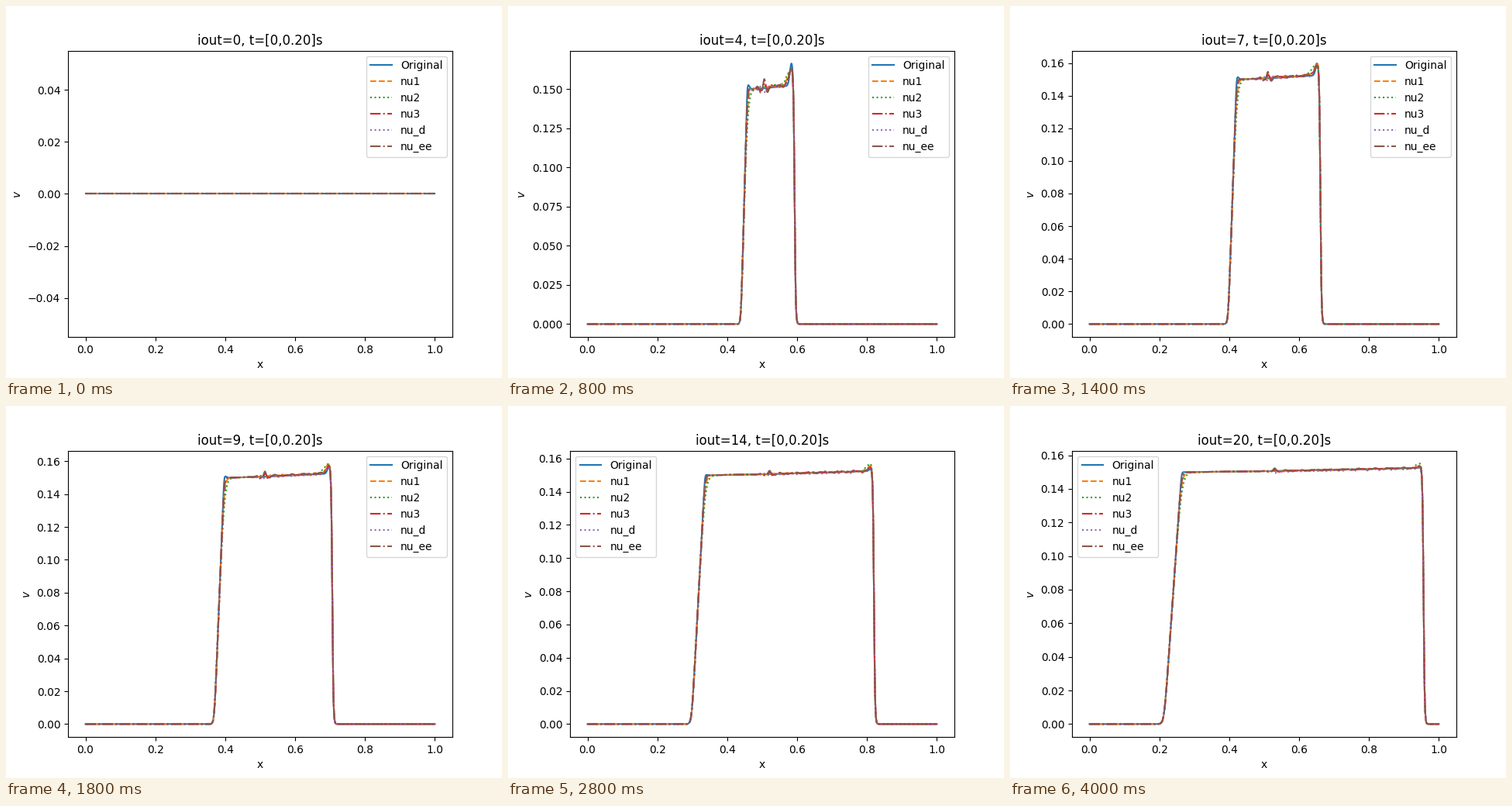
A matplotlib script for the animation above (4.2 s loop, 640 by 480 pixels).

```python
import numpy as np
import matplotlib.pyplot as plt
from matplotlib.animation import FuncAnimation

FRAMES, INTERVAL = 21, 200
x = np.linspace(0, 1, 1000)

# label: line style, smoothing strength, kink at the contact
SERIES = {
    "Original": ("-", 0.0, 0.0),
    "nu1": ("--", 0.6, 0.3),
    "nu2": (":", 1.0, 0.3),
    "nu3": ("-.", 0.3, 0.5),
    "nu_d": (":", 0.3, -0.5),
    "nu_ee": ("-.", 0.3, 1.0),
}


def bump(center, width):
    return np.exp(-((x - center) / width) ** 2)


def step(z):
    return 0.5 * (1 + np.tanh(z / 2))


def soft_ramp(start, rounding):
    return rounding * np.logaddexp(0, (x - start) / rounding)


def ripples(u, seed):
    """A few seeded waves carried along with the contact."""
    rng = np.random.default_rng(seed)
    waves = zip(rng.uniform(0.016, 0.045, 3), rng.uniform(0, 2 * np.pi, 3))
    return sum(np.sin(2 * np.pi * u / length + phase) for length, phase in waves) / 2


def velocity(n, blur, kink):
    """Plateau between a widening rarefaction fan and a moving shock."""
    if n == 0:
        return np.zeros_like(x)
    fade = np.exp(-(n - 4) / 5)
    middle, fan_width = 0.5005 - 0.0131 * n, 0.010 + 0.002 * n
    head, tail = middle - fan_width / 2, middle + fan_width / 2
    contact, shock = 0.5 + 0.0015 * n, 0.502 + 0.0227 * n

    foot = 0.0013 + 0.0001 * n
    shoulder = (0.0008 + 0.0032 * blur) * (1 + 0.03 * n)
    fan = (soft_ramp(head, foot) - soft_ramp(tail, shoulder)) / fan_width
    front = step((shock - x) / 0.0016)

    level = np.interp(x, [tail, contact, shock], [0.1499, 0.1506, 0.1525])
    level += 0.0030 * np.exp(-4 * blur) * fade * bump(tail + 0.002, 0.006)
    crest = 0.010 + 0.0048 * np.exp(-12 * blur)
    crest *= np.exp(-(n - 4) / (4.5 + 7 * blur))
    level += crest * bump(shock - 0.0085, 0.007 + 0.011 * blur)

    if blur:
        u = x - contact
        behind = step(u / 0.002)
        level += behind * (0.0007 * fade + 0.0009 * min(kink, 0))
        level += (behind * (0.0003 + 0.0007 * fade)
                  * ripples(u, int(100 * (blur + kink + 1))))
        period = 0.018 + 0.0007 * n
        level += (kink * (0.0015 + 0.0040 * fade)
                  * np.cos(2 * np.pi * u / period) * np.exp(-np.abs(u) / 0.015))
    return np.clip(fan, 0, None) * front * level


def highest(n):
    sharp_crest = 0.1525 + 0.0138 * np.exp(-(n - 4) / 4.5)
    smooth_crest = 0.1550 + 0.00032 * (20 - n)
    return max(sharp_crest, smooth_crest)


def draw(n):
    ax.clear()
    for label, (style, blur, kink) in SERIES.items():
        ax.plot(x, velocity(n, blur, kink), style, label=label)
    if n:
        ax.set_ylim(-0.05 * highest(n), 1.05 * highest(n))
    ax.set_title(f"iout={n}, t=[0,0.20]s")
    ax.set_xlabel("x")
    ax.set_ylabel("$v$")
    ax.legend(loc="upper right" if n < 14 else "upper left")


fig, ax = plt.subplots(figsize=(6.4, 4.8), dpi=100)
anim = FuncAnimation(fig, draw, frames=FRAMES, interval=INTERVAL,
                     init_func=lambda: draw(0), repeat=True, repeat_delay=0)
plt.show()
```
